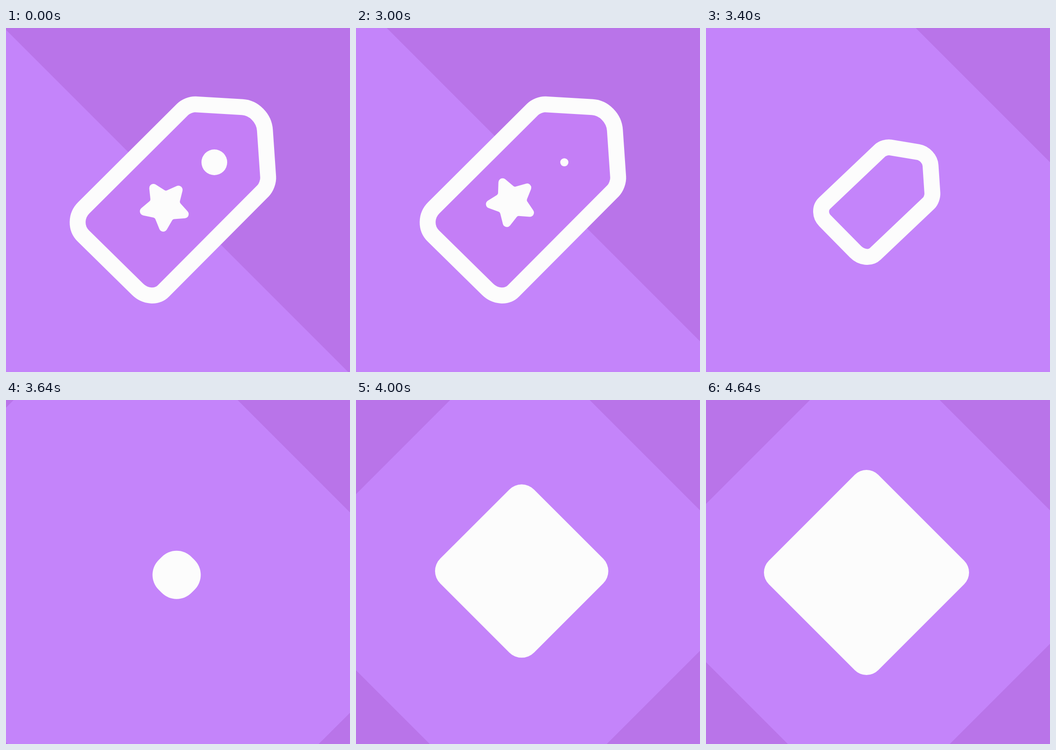
An HTML page with a canvas that plays this animation: 748 by 748 pixels, repeating every 5480 ms.

```html
<!DOCTYPE html>
<html lang="en">
<head>
<meta charset="utf-8">
<title>Tag animation</title>
<style>
  html, body { margin: 0; width: 100%; height: 100%; overflow: hidden; background: #c484fa; }
  canvas { display: block; width: 100vw; height: 100vh; }
</style>
</head>
<body>
<canvas id="stage" width="748" height="748"></canvas>
<script>
const SIZE = 748, LOOP = 5480, STEP = 40, REST = 2760;
const LIGHT = '#c484fa', DARK = '#b974e9', FILL = '#c47ef6', WHITE = '#fcfcfc';
const ctx = document.getElementById('stage').getContext('2d');

const clamp = v => Math.min(1, Math.max(0, v));
const lerp = (a, b, k) => a + (b - a) * k;
const mix = (p, q, k) => [lerp(p[0], q[0], k), lerp(p[1], q[1], k)];
const span = (t, from, to) => clamp((t - from) / (to - from));
const smooth = k => k * k * (3 - 2 * k);

// Cubic Bezier easing with handles (x1, 0) and (x2, 1)
function ease(k, x1, x2) {
  let lo = 0, hi = 1;
  for (let i = 0; i < 24; i++) {
    const u = (lo + hi) / 2, v = 1 - u;
    if (3 * u * v * v * x1 + 3 * u * u * v * x2 + u * u * u < k) lo = u;
    else hi = u;
  }
  return smooth((lo + hi) / 2);
}

// Straight sides of the tag along the centre of its line
const TAG_LARGE = [
  [[169, 391], [384, 177]], [[412, 166], [514, 172]], [[563, 222], [570, 324]],
  [[559, 354], [342, 572]], [[286, 568], [168, 452]]
];
const TAG_SMALL = [
  [[258, 381], [378, 267]], [[401, 260], [461, 270]], [[488, 299], [492, 359]],
  [[484, 381], [368, 491]], [[325, 486], [259, 419]]
];

// Point where the lines a-b and c-d cross
function meet([a, b], [c, d]) {
  const r = [b[0] - a[0], b[1] - a[1]], s = [d[0] - c[0], d[1] - c[1]];
  const k = ((c[0] - a[0]) * s[1] - (c[1] - a[1]) * s[0]) / (r[0] * s[1] - r[1] * s[0]);
  return mix(a, b, k);
}

function drawTag(shrink, fillAlpha) {
  const sides = TAG_LARGE.map((side, i) => side.map((p, j) => mix(p, TAG_SMALL[i][j], shrink)));
  ctx.beginPath();
  ctx.moveTo(...sides[0][0]);
  sides.forEach((side, i) => {
    const next = sides[(i + 1) % sides.length], corner = meet(side, next);
    ctx.lineTo(...side[1]);
    ctx.bezierCurveTo(...mix(side[1], corner, .55), ...mix(next[0], corner, .55), ...next[0]);
  });
  ctx.closePath();
  ctx.globalAlpha = fillAlpha;
  ctx.fillStyle = FILL;
  ctx.fill();
  ctx.globalAlpha = 1;
  ctx.strokeStyle = WHITE;
  ctx.lineWidth = 34.6;
  ctx.stroke();
}

// The star swings around the dot and spins as it goes
function drawStar(swing, alpha) {
  const rad = Math.PI / 180, orbit = (138.5 + swing) * rad;
  const polar = (r, deg) => [r * Math.cos(deg * rad), r * Math.sin(deg * rad)];
  // An opaque tint lets fill and stroke overlap evenly
  const tint = [196, 126, 246].map(c => Math.round(lerp(c, 252, alpha)));
  ctx.save();
  ctx.translate(453 + 144 * Math.cos(orbit), 292 + 144 * Math.sin(orbit));
  ctx.rotate((22 + swing * 1.68) * rad);
  ctx.beginPath();
  for (let i = 0; i < 5; i++) {
    const tip = polar(46.5, i * 72), notch = polar(23.1, i * 72 + 36), next = polar(46.5, i * 72 + 72);
    ctx.lineTo(...tip);
    ctx.lineTo(...mix(tip, notch, .75));
    ctx.quadraticCurveTo(...notch, ...mix(next, notch, .75));
  }
  ctx.closePath();
  ctx.lineWidth = 18;
  ctx.lineJoin = 'round';
  ctx.fillStyle = ctx.strokeStyle = `rgb(${tint})`;
  ctx.fill();
  ctx.stroke();
  ctx.restore();
}

function drawDot(scale) {
  ctx.fillStyle = WHITE;
  ctx.beginPath();
  ctx.arc(453, 292, 28 * scale, 0, 2 * Math.PI);
  ctx.fill();
}

function drawSquare(t) {
  const grow = ease(span(t, 3600, 4620), .14, 0);
  const drift = 1 - (1 - span(t, 3640, 4640)) ** 1.5;
  const half = lerp(46, 223, grow), radius = lerp(46, 36, grow);
  const side = (half + radius * (Math.SQRT2 - 1)) * Math.SQRT2;
  ctx.save();
  ctx.translate(lerp(371, 349, drift), 381 - 19.4 * grow + 13.4 * drift);
  ctx.rotate(Math.PI / 4);
  ctx.fillStyle = WHITE;
  ctx.beginPath();
  ctx.roundRect(-side / 2, -side / 2, side, side, radius);
  ctx.fill();
  ctx.restore();
}

function drawCorner(x, y, leg) {
  if (leg <= 0) return;
  ctx.fillStyle = DARK;
  ctx.beginPath();
  ctx.moveTo(x, y);
  ctx.lineTo(x ? x - leg : leg, y);
  ctx.lineTo(x, y ? y - leg : leg);
  ctx.fill();
}

function drawBackground(t) {
  const first = ease(span(t, 2800, 3760), .42, .18);
  const rest = ease(span(t, 3320, 4280), .42, .18);
  ctx.fillStyle = LIGHT;
  ctx.fillRect(0, 0, SIZE, SIZE);
  drawCorner(SIZE, 0, lerp(752, 240, first));
  drawCorner(0, 0, lerp(-158, 226, rest));
  drawCorner(SIZE, SIZE, lerp(-57, 218, rest));
  drawCorner(0, SIZE, lerp(-141, 178, rest));
}

function draw(t) {
  drawBackground(t);
  if (t >= 3600) return drawSquare(t);

  drawTag(2.07 * smooth(span(t, 3200, 3610)), 1 - span(t, 3200, 3400));
  drawDot(1 - smooth(span(t, 2800, 3120)));

  const alpha = 1 - span(t, 3130, 3270), swung = t - REST;
  if (alpha > 0) drawStar(.119 * swung - .000414 * swung * swung, alpha);
}

const start = performance.now();
function tick() {
  const t = (performance.now() - start) % LOOP;
  draw(Math.max(REST, Math.floor(t / STEP) * STEP));
  requestAnimationFrame(tick);
}
tick();
</script>
</body>
</html>
```
